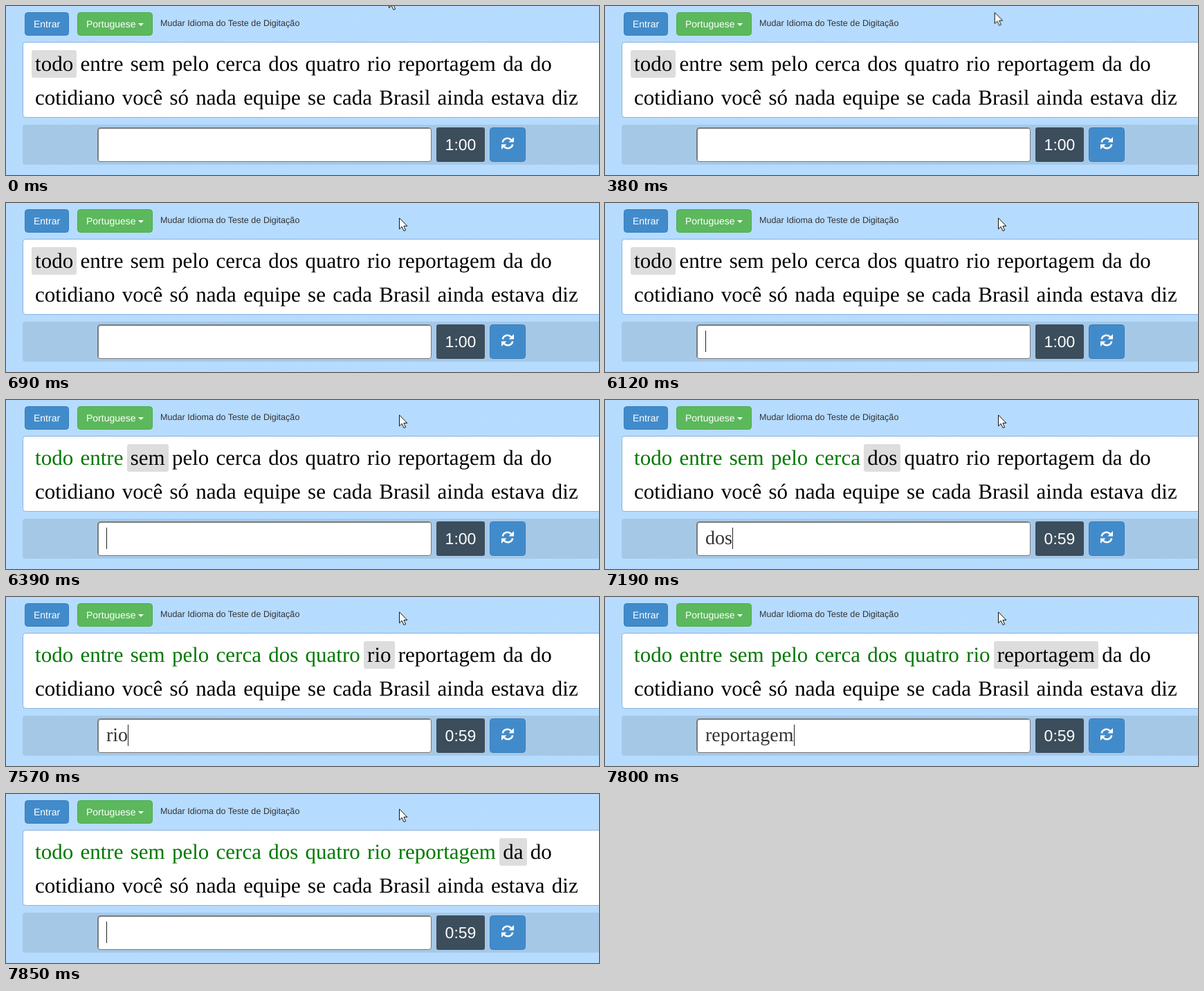
Recreate the animation shown at these times as an HTML page. Size 857 by 245 pixels, loop 7.99 s.

```html
<!DOCTYPE html>
<html lang="pt">
<head>
<meta charset="utf-8">
<title>Teste de Digitação</title>
<style>
  html, body { margin: 0; width: 100%; height: 100%; overflow: hidden; }
  body {
    position: relative;
    background: repeating-linear-gradient(45deg, #b1d8fe 0 1.414px, #bbdffe 1.414px 2.828px);
    font-family: "Liberation Sans", Arial, sans-serif;
    text-rendering: geometricPrecision;
  }
  svg { position: absolute; left: 0; top: 0; }
  .line {
    position: absolute; left: 36.9px; display: flex;
    font: 31px/39px "Liberation Serif", "Times New Roman", serif;
    color: #000; white-space: nowrap;
  }
  .line span { height: 40px; padding: 0 5.15px; border-radius: 3px; }
  .line .done { color: #007800; }
  .line .current { background: #ddd; }
  #field {
    position: absolute; left: 132px; top: 176px; width: 483px; height: 50px;
    box-sizing: border-box; border: 1px solid #777; border-radius: 4px;
    background: #fff; box-shadow: inset 1px 1px 1px #777;
  }
  #entry {
    position: absolute; left: 145px; top: 185px; height: 31px;
    font: 28px/31px "Liberation Serif", "Times New Roman", serif;
    color: #333; white-space: pre; visibility: hidden;
  }
  #entry::after {
    content: ""; position: absolute; left: 100%; top: 0;
    width: 1px; height: 31px; background: #222;
  }
  #pointer { animation: glide 7990ms infinite; }
  @keyframes glide {
    0%, 1.6% { transform: translate(553px, -14px); animation-timing-function: cubic-bezier(.3, .3, .5, 1); }
    8.63%, 100% { transform: translate(568px, 21px); }
  }
</style>
</head>
<body>
<svg width="857" height="245" viewBox="0 0 857 245">
  <rect x="24.5" y="52.5" width="850" height="109" rx="4" fill="#fff" stroke="#86b2dd"/>
  <rect x="24" y="172" width="850" height="58" rx="4" fill="#a6c8e7"/>

  <g stroke="#357ebd" fill="#428bca">
    <rect x="27.5" y="9.5" width="63" height="33" rx="4"/>
    <rect x="699.5" y="176.5" width="51" height="49" rx="4"/>
  </g>
  <rect x="103.5" y="9.5" width="108" height="33" rx="4" fill="#5cb85c" stroke="#4cae4c"/>
  <g font-size="14" fill="#fff">
    <text x="40" y="31">Entrar</text>
    <text x="116" y="31">Portuguese</text>
    <path d="M191 25h8l-4 4z"/>
  </g>
  <text x="223" y="29" font-size="12.6" fill="#333">Mudar Idioma do Teste de Digitação</text>

  <rect x="622" y="176" width="70" height="50" rx="3" fill="#3c4d5c"/>
  <text id="timer" x="657" y="209" font-size="23" fill="#fff" text-anchor="middle">1:00</text>

  <g transform="translate(725 199)" fill="#fff">
    <g id="half">
      <path d="M-7.2 -1.5A7 7 0 0 1 5 -4.8" fill="none" stroke="#fff" stroke-width="2.6"/>
      <path d="M9 -9V-1.5H1.5z"/>
    </g>
    <use href="#half" transform="rotate(180)"/>
  </g>
</svg>

<div class="line" style="top:64px"></div>
<div class="line" style="top:113px"></div>
<div id="field"></div>
<div id="entry"></div>

<svg width="857" height="245" viewBox="0 0 857 245">
  <path id="pointer" d="M.5 .8V16.8L4.2 13.3L7 19.5L9.6 18.4L6.9 12.4H11.8z" fill="#fff" stroke="#111" stroke-linejoin="round"/>
</svg>

<script>
  const LOOP = 7990, FOCUS = 6120, TICK = 7130;
  const texts = [
    "todo entre sem pelo cerca dos quatro rio reportagem da do",
    "cotidiano você só nada equipe se cada Brasil ainda estava diz"
  ];
  // When each word appears in the field, and when it is accepted.
  const entries = [
    [6170, 6195], [6365, 6390], [6550, 6580], [6740, 6760], [6970, 6990],
    [7190, 7210], [7390, 7410], [7570, 7600], [7800, 7850]
  ];

  document.querySelectorAll(".line").forEach((line, i) => {
    for (const word of texts[i].split(" ")) {
      line.appendChild(document.createElement("span")).textContent = word;
    }
  });
  const words = [...document.querySelectorAll(".line span")];
  const entry = document.getElementById("entry");
  const timer = document.getElementById("timer");

  function render(t) {
    const done = entries.filter(([, accepted]) => t >= accepted).length;
    const typing = done < entries.length && t >= entries[done][0];
    words.forEach((word, i) => {
      word.className = i < done ? "done" : i === done ? "current" : "";
    });
    entry.textContent = typing ? words[done].textContent : "";
    entry.style.visibility = t >= FOCUS ? "visible" : "hidden";
    timer.textContent = t >= TICK ? "0:59" : "1:00";
  }

  const start = performance.now();
  function frame() {
    render((performance.now() - start) % LOOP);
    requestAnimationFrame(frame);
  }
  frame();
</script>
</body>
</html>
```
